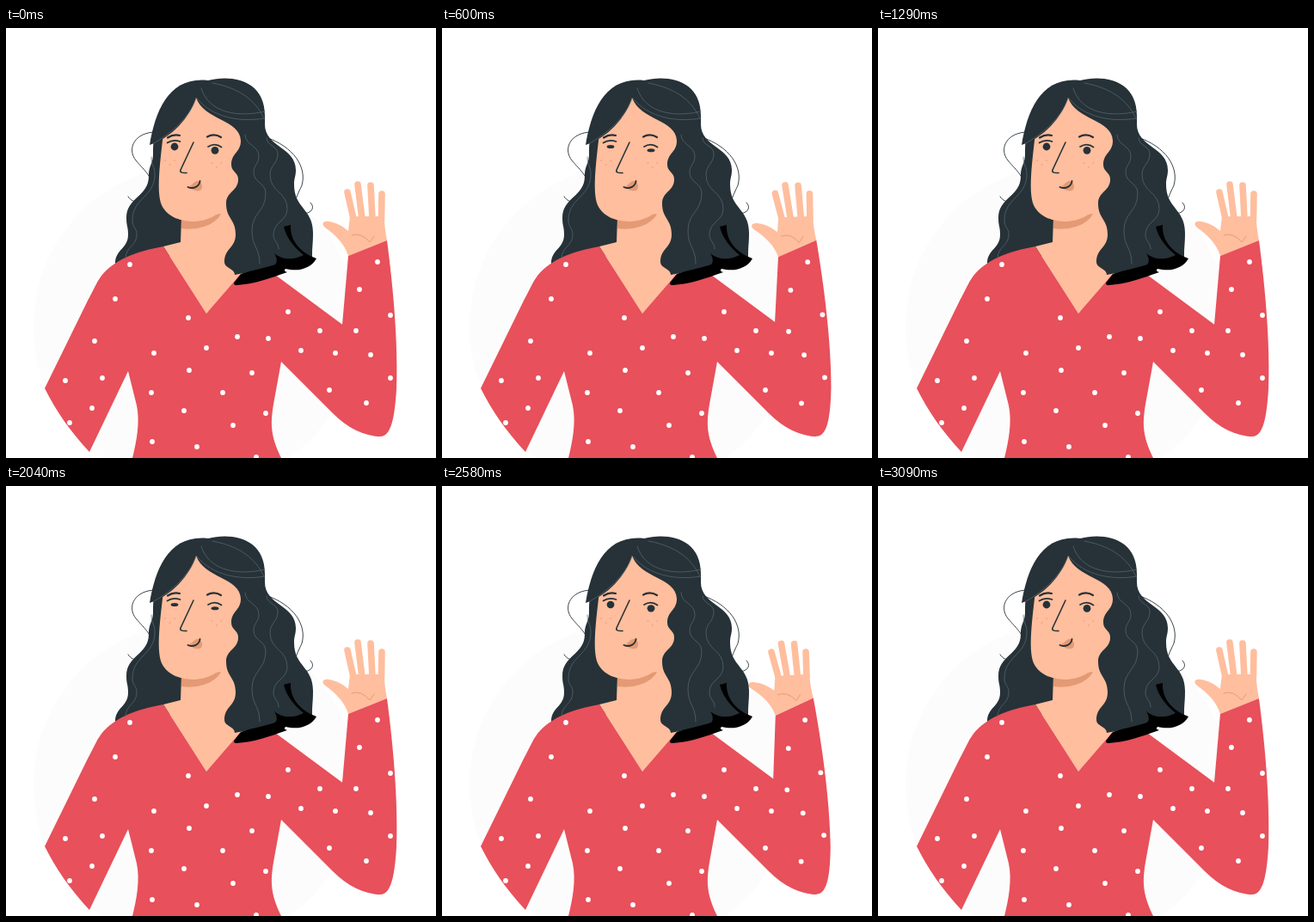
Animation, 500 px wide and 500 px high, one loop 3.12 s. Source, as an HTML page with a canvas:

```html
<!DOCTYPE html>
<html lang="en">
<head>
<meta charset="utf-8">
<title>Waving hello</title>
<style>
  html, body { margin: 0; width: 100%; height: 100%; overflow: hidden; background: #fff; }
  canvas { display: block; width: 500px; height: 500px; }
</style>
</head>
<body>
<canvas id="stage" width="500" height="500"></canvas>
<script>
const ctx = document.getElementById('stage').getContext('2d');
const LOOP = 3120, STEP = 30, BLINK = LOOP / 2;
const RED = '#e8505b', SKIN = '#ffbe9d', SHADE = '#e39a75', HAIR = '#263238', STRAND = '#5b6a72';

// A lock of hair: S-bends between its outermost points, upright at each one
function wavy(x, y, ...bends) {
  let d = `${x} ${y}`;
  for (let i = 0; i < bends.length; i += 2) {
    const [nx, ny] = [bends[i], bends[i + 1]];
    const mid = (y + ny) / 2;
    d += `C${x} ${mid} ${nx} ${mid} ${nx} ${ny}`;
    [x, y] = [nx, ny];
  }
  return d;
}

const fill = (d, color) => {
  ctx.fillStyle = color;
  ctx.fill(new Path2D(d));
};

const line = (d, color, width) => {
  ctx.strokeStyle = color;
  ctx.lineWidth = width;
  ctx.lineCap = ctx.lineJoin = 'round';
  ctx.stroke(new Path2D(d));
};

function oval(x, y, rx, ry, color) {
  ctx.fillStyle = color;
  ctx.beginPath();
  ctx.ellipse(x, y, rx, ry, 0, 0, 2 * Math.PI);
  ctx.fill();
}

const dots = (points, r, color) => points.forEach(([x, y]) => oval(x, y, r, r, color));

const bodyDots = [
  [144, 275], [127, 315], [103, 364], [69, 410], [112, 407], [100, 442], [74, 459],
  [212, 337], [172, 378], [233, 372], [269, 359], [305, 361], [213, 398], [286, 401], [169, 424],
  [252, 424], [207, 445], [264, 462], [302, 448], [170, 481], [222, 487], [291, 499],
  [328, 330], [365, 352], [343, 375], [383, 378], [376, 421]
];
const armDots = [[432, 272], [411, 304], [447, 334], [407, 352], [424, 380], [447, 407], [419, 436]];

const clamp = x => Math.max(0, Math.min(1, x));
const inOut = x => (1 - Math.cos(Math.PI * clamp(x))) / 2;
const quick = x => 1 - Math.pow(1 - clamp(x), 2.2);

// Rises from 0 to 1 at the peak, then falls back to 0
function pulse(t, from, peak, to, rise = inOut) {
  return t < peak ? rise((t - from) / (peak - from)) : 1 - inOut((t - peak) / (to - peak));
}

function armAngle(t) {
  const swing = t < LOOP / 2 ? pulse(t, 0, 420, 890) : pulse(t, 2184, 2640, 3110, quick);
  return -3 * swing * Math.PI / 180;
}

function drawBack() {
  ctx.fillStyle = '#fff';
  ctx.fillRect(0, 0, 500, 500);
  oval(220, 347, 188, 188, '#fcfcfc');
  line('M174 121C150 121 140 140 151 154C162 167 172 174 168 187C163 204 148 206 142 196', HAIR, 0.9);
  line('M302 127C335 138 350 162 344 183C338 196 332 206 341 214C350 219 362 211 354 203', HAIR, 0.9);
  fill('M' + wavy(172, 120, 171, 146, 166, 172, 140, 221, 142, 240, 127, 274) + 'L215 262L215 120Z', HAIR);
}

function drawHead() {
  fill('M204 220L203 249L183 254L233 332L275 288L272 190Z', SKIN);
  fill('M204 222L250 216C244 228 225 236 204 233Z', SHADE);
  fill('M183 122C180 150 174 190 181 206C188 221 205 225 220 225C235 224 247 217 256 208L275 180L285 125L222 75Z', SKIN);
}

function drawTorso() {
  fill('M183 254C150 260 127 269 111 288C105 296 101 306 95 317L45 419C58 445 74 468 97 493' +
    'L142 399L152 439C156 458 152 480 147 500L320 500C307 473 307 459 312 432L320 388' +
    'L380 448C397 465 415 474 435 475L440 381L313 287L272 287L233 332Z', RED);
}

function drawHand() {
  const fingers = [[397, 191, 404], [409, 182, 414], [424, 183, 426], [437, 193, 436.5]];
  fingers.forEach(([x, y, base]) => line(`M${x} ${y}L${base} 222`, SKIN, 7.6));
  fill('M398 265C394 252 385 242 371 232C366 228 369 224 375 225C384 226 392 231 398 236' +
    'L400 219L440 219C440 230 441 236 443 247Z', SKIN);
  line('M402 241Q413 237 423 249L428 242', SHADE, 0.9);
}

function drawArm(angle) {
  const elbow = [430, 463];
  ctx.save();
  ctx.translate(...elbow);
  ctx.rotate(angle);
  ctx.translate(-elbow[0], -elbow[1]);
  drawHand();
  fill('M398 265L391 345L390 430L410 465C420 473 428 475 435 475C448 475 452 452 454 420C456 365 450 300 443 247Z', RED);
  dots(armDots, 2.9, '#fff');
  ctx.restore();
}

function drawFace(open) {
  line('M188 127.5Q195 123 202 125M234 126.5Q242 122 250 127', HAIR, 2.2);
  line('M187.5 133.5Q194 129 202.5 132M235 138Q243 133 250.5 138.5', HAIR, 1.7);
  oval(196, 138, 4.4, 4.4 * open, HAIR);
  oval(243, 142.3, 4.4, 4.4 * open, HAIR);
  line('M218 133L203 165Q201.5 169 210 168.5', HAIR, 1.6);
  fill('M212 184.5C217 183 219 177 224 178C228 180 229 184 227 188C223 191 217 189 212 184.5Z', SHADE);
  line('M211.5 185C218 188 225 184 225.5 178', HAIR, 1.9);
  for (let i = 0; i < 3; i++) {
    const dip = i === 1 ? 5 : 0;
    oval(185 + 5.5 * i, 154 + dip, 0.8, 0.8, SHADE);
    oval(239.5 + 5.3 * i, 157 + dip, 0.8, 0.8, SHADE);
  }
}

function drawFrontHair() {
  const outer = wavy(301, 112, 337, 165, 335, 182, 357, 238, 356, 266);
  const inner = wavy(266, 287, 254, 272, 267, 240, 256, 204, 270, 176, 262, 159, 273, 131);
  fill(`M167 136C174 95 190 56 235 61C262 54 301 60 301 102L${outer}L318 277L${inner}` +
    'C272 106 231 108 221 81C214 104 192 128 167 136Z', HAIR);

  const locks = [
    wavy(278, 124, 294, 149, 288, 168, 302, 192, 286, 236, 295, 274),
    wavy(303, 128, 316, 146, 307, 171, 327, 210, 311, 240, 317, 257),
    wavy(169, 150, 173, 170, 147, 224, 152, 240, 139, 268),
    '221 82C213 104 193 122 172 134',
    '227 70C236 100 272 104 301 97',
    '240 64C272 70 290 84 300 105',
    '222 82C240 104 272 110 301 105'
  ];
  locks.forEach(d => line('M' + d, STRAND, 0.7));

  fill('M323 231L331 229C330 246 341 261 361 268C355 279 341 284 325 280C323 282 324 283 327 284' +
    'C307 291 288 298 268 299C265 299 264 297 266 295L273 286C288 281 301 279 313 275' +
    'C316 272 315 267 312 262C321 270 335 270 346 264C335 255 326 244 323 231Z', '#000');
}

function draw(t) {
  drawBack();
  drawHead();
  drawTorso();
  drawArm(armAngle(t));
  dots(bodyDots, 2.9, '#fff');
  drawFace(1 - 0.55 * pulse(t % BLINK, 0, 540, 1140));
  drawFrontHair();
}

const begin = performance.now();
function tick(now) {
  const t = Math.max(0, now - begin) % LOOP;
  draw(Math.floor(t / STEP) * STEP);
  requestAnimationFrame(tick);
}
draw(0);
requestAnimationFrame(tick);
</script>
</body>
</html>
```
